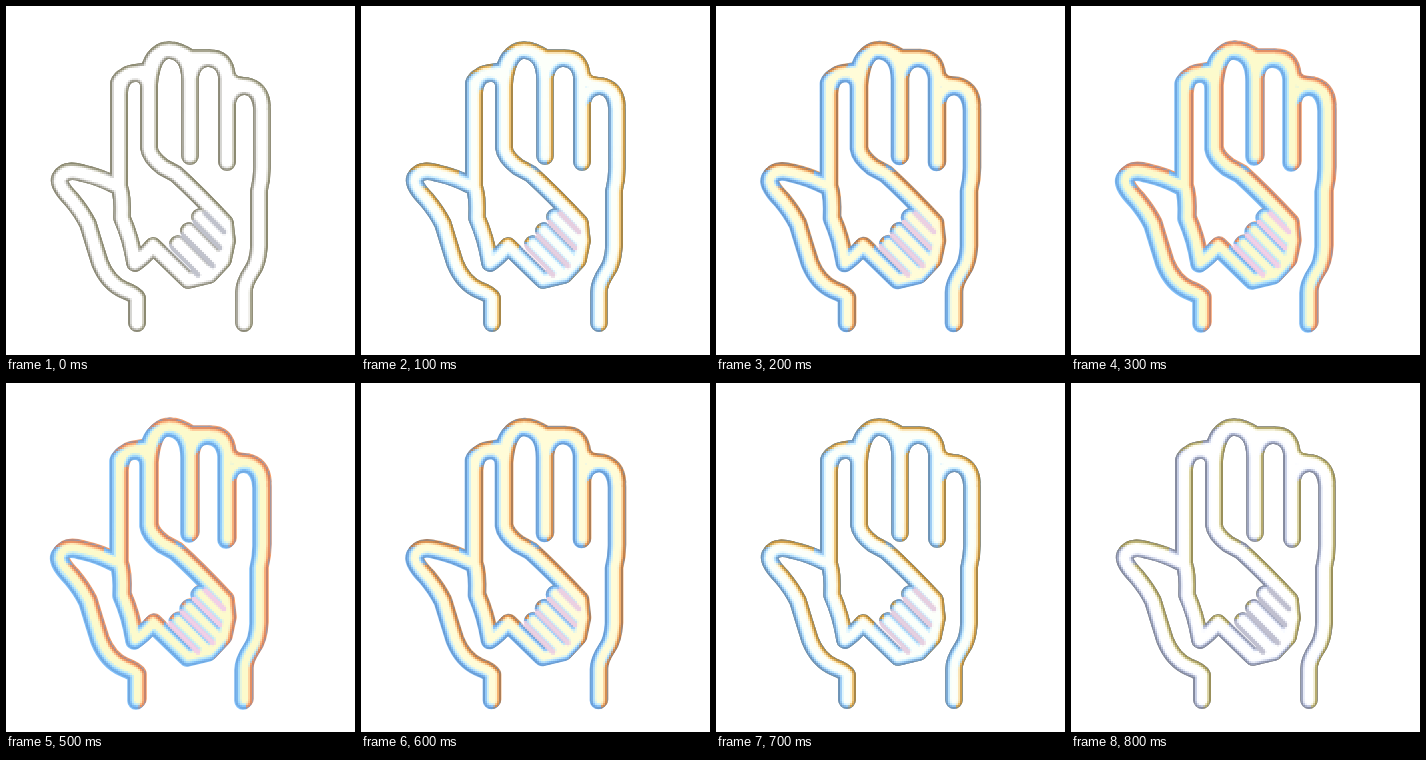
Animation, 349 px wide and 349 px high, one loop 0.9 s. Source, as an HTML page with a canvas:

```html
<!DOCTYPE html>
<html lang="en">
<head>
<meta charset="utf-8">
<style>
  html, body { margin: 0; width: 100%; height: 100%; overflow: hidden; background: #fff; }
  canvas { display: block; }
</style>
</head>
<body>
<canvas id="stage" width="349" height="349"></canvas>
<script>
const SIZE = 349, STEP = 100, BLOCK = 2;
const BAND = 17.5, RINGS = [BAND, 14, 11], CORE = 7.5;

// Centre lines: thumb, outer contour, arm, finger gaps, palm edge,
// rounded finger tops, and the four fingers of the small hand.
const hand = new Path2D(`
  M131 317V292Q129 288 118 284Q102 277 94 257Q88 238 82 218Q76 206 66 194
  Q51 179 54 172Q59 162 76 167Q94 171 109 179
  M113 180V77Q116 67 143 65C146 50 155 44 163 44S178 48 184 52H203
  C216 52 220 60 221 70C226 81 235 79 241 80C251 82 256 93 256 104V162
  Q256 173 253 185V240Q252 257 246 265Q238 277 238 286V317
  M143 65V142Q144 151 157 161L170 168Q192 188 219 217L221 235L217 254L203 269L182 274
  M184 52V150 M221 70V156
  M113 180Q117 190 116 212Q125 232 129 257Q137 252 147 240
  M113 88Q114 68 128 67Q143 67 143 82
  M143 80Q146 45 163 44Q184 46 184 74
  M184 72Q186 53 203 52Q219 54 221 72
  M221 98Q223 81 239 80Q255 82 256 100
  M194 211L217 234 M183 225L212 254 M172 238L201 267 M147 240L181 273`);
const slits = new Path2D(
  'M199 207L218 226M188 216L214 242M176 229L207 260M163 240L192 269');

// Ring colours from the rim inwards, on the lower left (cool) and upper right
// (warm), from no colour split to the widest; the last is the afterglow.
const looks = [
  { cool: ['#8c8a78', '#c9c8c4', '#ffffff'], warm: ['#8c8a70', '#c4c2b0', '#ffffff'],
    core: '#ffffff', slit: '#c0c2cc', spread: 0 },
  { cool: ['#6c93b8', '#8cc0f0', '#d0f0ff'], warm: ['#b08438', '#e8b458', '#fff4d4'],
    core: '#fcfffa', slit: '#e6cfe0', spread: 0 },
  { cool: ['#6a9cd0', '#80bcfa', '#c8ecfa'], warm: ['#b87a48', '#f0a058', '#ffe8b8'],
    core: '#fffcd8', slit: '#ecd0e2', spread: 0.6 },
  { cool: ['#70a8e0', '#82c2fc', '#beeaf8'], warm: ['#d08060', '#f89e68', '#ffdcaa'],
    core: '#fcfacc', slit: '#f2cfe6', spread: 1 },
  { cool: ['#78b0ee', '#84c8ff', '#b4e6f4'], warm: ['#e88878', '#ff9c78', '#ffd09c'],
    core: '#f8f6c4', slit: '#f8ceea', spread: 1.5 },
  { cool: ['#848aa0', '#b8c0dc', '#f8faff'], warm: ['#9c9050', '#cfc68c', '#fffef4'],
    core: '#ffffff', slit: '#c0c0d0', spread: 0 }
];
const sequence = [0, 1, 2, 3, 4, 3, 2, 1, 5];

function makeLayer(block) {
  const canvas = document.createElement('canvas');
  canvas.width = canvas.height = Math.ceil(SIZE / block);
  const c = canvas.getContext('2d');
  c.scale(1 / block, 1 / block);
  return c;
}

function paint(c, color, width, shift = 0, path = hand) {
  c.save();
  c.translate(-shift, shift);
  c.lineCap = c.lineJoin = 'round';
  c.strokeStyle = color;
  c.lineWidth = width;
  c.stroke(path);
  c.restore();
}

function paintRings(c, colors) {
  RINGS.forEach((width, i) => paint(c, colors[i], width));
}

const stage = document.getElementById('stage').getContext('2d');
const band = makeLayer(1), shade = makeLayer(BLOCK), warmSide = makeLayer(BLOCK);
const layerSide = shade.canvas.width * BLOCK;

function draw({ cool, warm, core, slit, spread }) {
  for (const c of [band, shade, warmSide]) c.clearRect(0, 0, layerSide, layerSide);

  // Keep only the upper right side of the warm rings.
  paintRings(warmSide, warm);
  warmSide.globalCompositeOperation = 'destination-out';
  paint(warmSide, '#000', BAND, 6.5);
  warmSide.globalCompositeOperation = 'source-over';

  paintRings(shade, cool);
  shade.drawImage(warmSide.canvas, 0, 0, layerSide, layerSide);
  paint(shade, core, CORE, -spread / 2);
  paint(shade, slit, 5, 0, slits);

  // Colour fringes beyond the band, then the coarse shading inside it.
  paint(band, cool[1], BAND, spread);
  paint(band, warm[1], BAND, -spread);
  paint(band, cool[0], BAND);
  band.globalCompositeOperation = 'source-atop';
  band.imageSmoothingEnabled = false;
  band.drawImage(shade.canvas, 0, 0, layerSide, layerSide);
  band.globalCompositeOperation = 'source-over';

  stage.fillStyle = '#fff';
  stage.fillRect(0, 0, SIZE, SIZE);
  stage.drawImage(band.canvas, 0, 0);
}

function tick() {
  const step = Math.floor(performance.now() / STEP) % sequence.length;
  draw(looks[sequence[step]]);
  requestAnimationFrame(tick);
}
tick();
</script>
</body>
</html>
```
